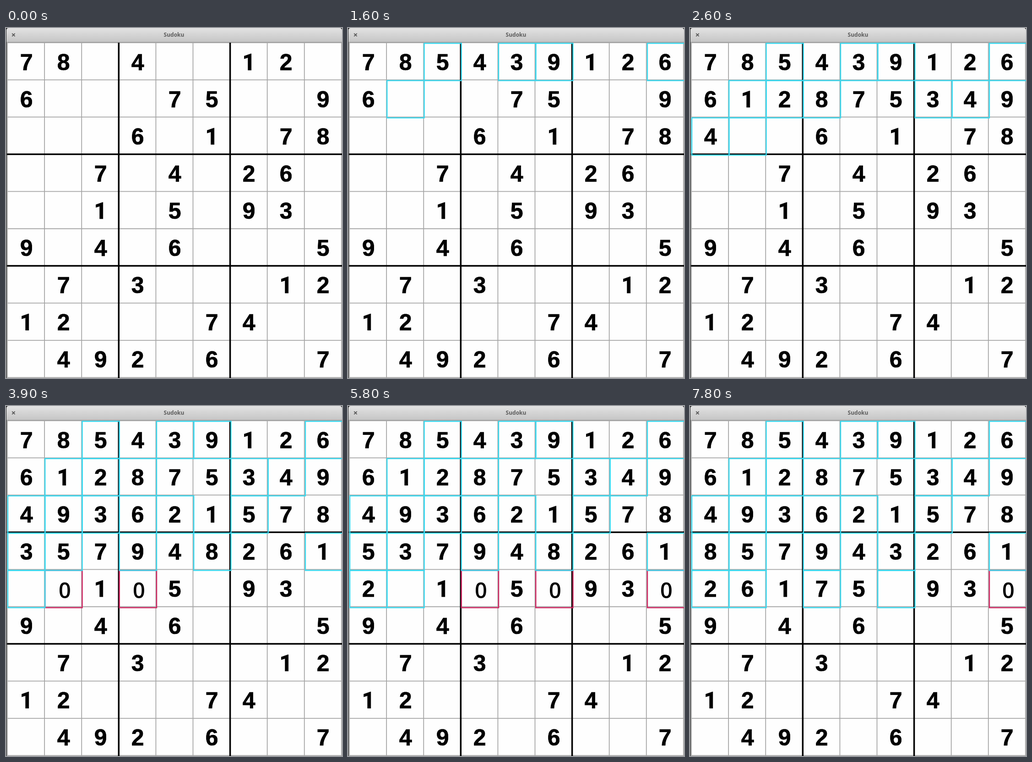
An HTML page that plays this animation: 734x763 px, repeating every 8 s.

```html
<!DOCTYPE html>
<html lang="en">
<head>
<meta charset="utf-8">
<title>Sudoku</title>
<style>
  html, body { margin: 0; width: 100%; height: 100%; overflow: hidden; background: #fff; }
  svg { display: block; width: 734px; height: 763px; }
  text { text-anchor: middle; }
  .digit { font: bold 50px "Liberation Sans", Arial, sans-serif; stroke: #000; stroke-width: .7px; }
  .digit.one { font-family: Roboto, sans-serif; }
  .zero { font: 600 47px "Open Sans", "Noto Sans", sans-serif; }
  .title { font: bold 12px "Open Sans", "Noto Sans", sans-serif; fill: #5c5c5c; }
</style>
</head>
<body>
<svg id="stage" viewBox="0 0 734 763">
  <defs>
    <linearGradient id="bar" x2="0" y2="1">
      <stop offset="0" stop-color="#e2e2e2"/>
      <stop offset="1" stop-color="#c6c6c6"/>
    </linearGradient>
  </defs>
  <rect width="734" height="763" fill="#fefefe"/>
  <rect width="734" height="8" fill="#1c1c1c"/>
  <rect width="1.5" height="763" fill="#2a2c2d"/>
  <path d="M1 30V5Q1 0 6 0H729Q734 0 734 5V30Z" fill="url(#bar)"/>
  <path d="M1 30.5H734" stroke="#a9a9a9"/>
  <path d="M13.2 11.8l6.4 6.4m0-6.4l-6.4 6.4" stroke="#555" stroke-width="1.8"/>
  <text class="title" x="367" y="19.3">Sudoku</text>
  <g id="grid" fill="none"></g>
  <g id="givens"></g>
  <g id="red"></g>
  <g id="cyan"></g>
</svg>
<script>
const LOOP = 8000;
const DIGIT_PITCH = 81, LINE_PITCH = 81.1, BOX_PITCH = 81.25;
const givens = [
  "78.4..12.", "6...75..9", "...6.1.78",
  "..7.4.26.", "..1.5.93.", "9.4.6...5",
  ".7.3...12", "12...74..", ".492.6..7"
];

// Each entry is row, column, value: "_" is a cell being tried, "0" one given up.
const steps = [
  [900, "02_"], [1000, "023 04_"], [1100, "02_ 040"], [1200, "025 04_"],
  [1400, "043 05_"], [1500, "059 08_"], [1600, "086 11_"], [1700, "111 12_"],
  [1800, "122 13_"], [1900, "138 16_"], [2000, "163 17_"], [2100, "174 20_"],
  [2200, "203 21_"], [2300, "210"], [2400, "20_"], [2600, "204 21_"],
  [3900, "219 223 242 265 303 315 339 358 381 40_ 410 430"],
  [4100, "408 41_"],
  [4400, "330 350 380 400 410 430 450 480"],
  [4700, "30_ 310"], [5000, "305 313 33_"], [5300, "339 358 38_"],
  [5600, "381"], [5800, "402 41_"], [6200, "330 350 380 400 410"],
  [6500, "308 31_"], [6900, "315"], [7300, "339 353 38_"],
  [7800, "381 402 416 437 45_"]
];

const layer = id => document.getElementById(id);

function label(row, col, value, className, dx = 0, dy = 0) {
  const x = 44.7 + DIGIT_PITCH * col + dx, y = 92 + DIGIT_PITCH * row + dy;
  return `<text class="${className}" x="${x}" y="${y}">${value}</text>`;
}

const digit = (row, col, value) =>
  label(row, col, value, value === "1" ? "digit one" : "digit");

function outline(row, col, color) {
  return `<rect x="${4 + BOX_PITCH * col}" y="${33.4 + BOX_PITCH * row}"
    width="${BOX_PITCH}" height="${BOX_PITCH}" fill="none" stroke="${color}" stroke-width="2.4"/>`;
}

function gridLines(pick) {
  let d = "";
  for (let i = 0; i < 10; i++) {
    if (!pick(i)) continue;
    d += `M${3 + LINE_PITCH * i} 32V763M2 ${32 + LINE_PITCH * i}H734`;
  }
  return d;
}

const isBold = i => i === 3 || i === 6;
layer("grid").innerHTML =
  `<path d="${gridLines(i => !isBold(i))}" stroke="#a6a6a6" stroke-width="1.8"/>` +
  `<path d="${gridLines(isBold)}" stroke="#000" stroke-width="3.5"/>`;
layer("givens").innerHTML = givens.map((line, row) =>
  [...line].map((v, col) => v === "." ? "" : digit(row, col, v)).join("")).join("");

function draw(count) {
  const cells = {};
  for (const [, changes] of steps.slice(0, count))
    for (const [row, col, value] of changes.split(" ")) cells[row + col] = value;

  let red = "", cyan = "";
  for (const [key, value] of Object.entries(cells)) {
    const [row, col] = [...key].map(Number);
    if (value === "0") red += outline(row, col, "#cf2460") + label(row, col, 0, "zero", 2.7, 3);
    else cyan += outline(row, col, "#38daf1") + (value === "_" ? "" : digit(row, col, value));
  }
  layer("red").innerHTML = red;
  layer("cyan").innerHTML = cyan;
}

const start = performance.now();
let shown = -1;
function tick(now) {
  const time = Math.max(0, now - start) % LOOP;
  const count = steps.filter(([at]) => at <= time).length;
  if (count !== shown) draw(shown = count);
  requestAnimationFrame(tick);
}
tick(start);
</script>
</body>
</html>
```
